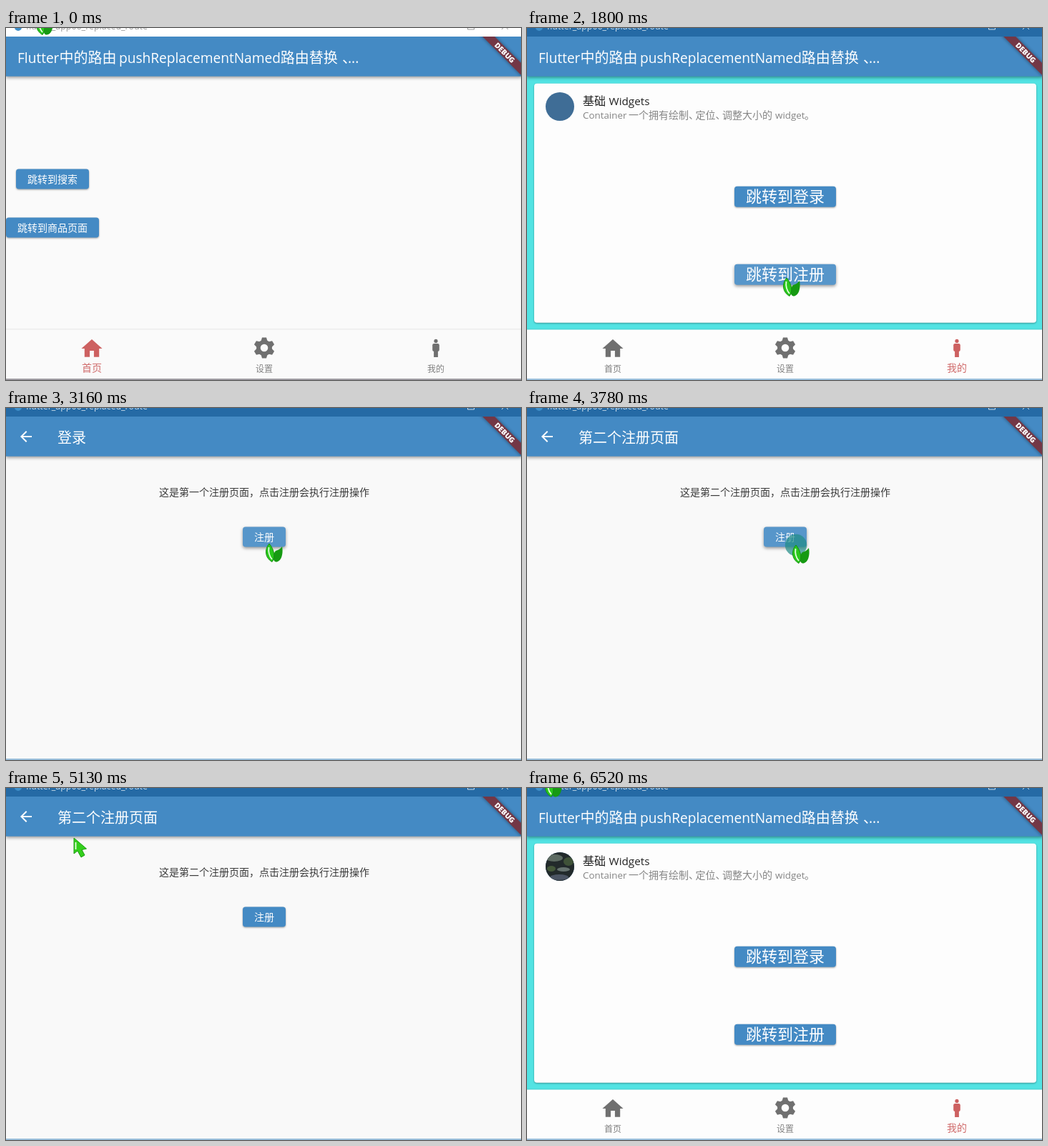
Animation of 720 by 493 pixels, one loop 6.72 s. Source, as an HTML page:

```html
<!DOCTYPE html>
<html lang="zh-CN">
<head>
<meta charset="utf-8">
<style>
html, body { margin: 0; height: 100%; overflow: hidden; background: #fafafa; }
svg { display: block; width: 100vw; height: 100vh; font-family: "Open Sans", "Noto Sans CJK SC", sans-serif;
  --bar: #256aa5; --ink: #cfdfec; --line: #3d86be; }
svg.inactive { --bar: #fff; --ink: #999; --line: #4a4450; }
.appbar { fill: #448ac4; filter: drop-shadow(0 2px 2px rgba(0,0,0,.38)); }
.button { filter: drop-shadow(0 1.5px 1px rgba(0,0,0,.36)); }
.button.hover { filter: drop-shadow(0 2.5px 2px rgba(0,0,0,.4)); }
.button .tint { fill: #fff; opacity: 0; }
.button.hover .tint { opacity: .1; }
.card { fill: #fdfdfd; filter: drop-shadow(0 1px 1px rgba(0,0,0,.35)); }
.banner { filter: drop-shadow(0 0 2.5px rgba(0,0,0,.5)); }
</style>
</head>
<body>
<svg id="stage" viewBox="0 0 720 493"></svg>
<script>
const LOOP = 6720;
const STEPS = [0, 170, 380, 580, 790, 990, 1210, 1410, 1610, 1800, 2000, 2190, 2390, 2590, 2790, 2990, 3180,
  3380, 3580, 3780, 3980, 4170, 4360, 4560, 4750, 4940, 5130, 5330, 5520, 5710, 5890, 6110, 6320, 6520];
const PRESS = 850, OPEN_FIRST = 2144, REPLACE = 3380, POP = 5674, ROUTE_MS = 300;

// time, x, y, hand pointer
const POINTER = [
  [0, 44, -16, 1], [170, 46, -10, 0], [790, 583, 453, 1], [1210, 583, 453, 1], [1410, 560, 440, 0],
  [1800, 360, 350, 1], [2000, 350, 344, 1], [2300, 349, 340, 0], [2590, 349, 340, 0], [2990, 365, 190, 1],
  [3180, 373, 192, 1], [3980, 373, 192, 0], [4360, 230, 120, 0], [4750, 60, 30, 0], [5130, 95, 70, 0],
  [5520, 27, 43, 1], [6110, 27, 43, 1], [6320, 27, 18, 1], [6520, 27, -13, 1], [LOOP, 27, -13, 1]
];
// time, x, y, colour, opacity
const CLICKS = [
  [980, 583, 453, '#4a9488', .48], [2150, 350, 344, '#5a7296', .36],
  [3380, 376, 192, '#1f8c86', .7], [5670, 28, 44, '#1d4468', .2]
];

const text = (x, y, size, str, fill = '#fff', anchor = 'start') =>
  `<text x="${x}" y="${y}" font-size="${size}" fill="${fill}" text-anchor="${anchor}">` +
  str.replace(/[\w.]+/g, s => `<tspan font-size="${size * .955}">${s}</tspan>`) + '</text>';

const button = (x, y, w, h, size, label) => {
  const box = `x="${x}" y="${y}" width="${w}" height="${h}" rx="4"`;
  return `<g class="button" data-box="${x},${y},${w},${h}"><rect ${box} fill="#448ac4"/><rect class="tint" ${box}/>` +
    text(x + w / 2, y + h / 2 + size * .37, size, label, '#fff', 'middle') + '</g>';
};

const appbar = '<rect class="appbar" y="12" width="720" height="55.7"/>';
const mainBar = appbar + text(16, 48.5, 20, 'Flutter中的路由') +
  text(158, 48.5, 20, 'pushReplacementNamed路由替换') + text(470, 48.5, 20, '、') + text(478, 48.5, 20, '...');

const tooth = a => `<path d="M-4.6-9L-3-14.5H3L4.6-9z" transform="rotate(${a})"/>`;
const TABS = [
  ['首页', 120, '<path d="M10 20v-6h4v6h5v-8h3L12 3 2 12h3v8z" transform="translate(-17.5 -16.4) scale(1.458)"/>'],
  ['设置', 361, '<circle r="8.1" fill="none" stroke="currentColor" stroke-width="5.6"/>' +
    [0, 60, 120, 180, 240, 300].map(tooth).join('')],
  ['我的', 601, '<circle cy="-9.6" r="2.6"/><rect x="-4.8" y="-6" width="9.6" height="11" rx="2.2"/>' +
    '<rect x="-2.9" y="0" width="5.8" height="13"/>']
];
const nav = (selected, fill) =>
  `<rect y="421" width="720" height="2" fill="#000" opacity=".05"/><rect y="422.5" width="720" height="71" fill="${fill}"/>` +
  (selected ? '' : '<circle id="ripple" cx="601.5" cy="457" r="35" fill="#ededed"/>') +
  TABS.map(([label, x, icon], i) => {
    const on = i === selected, color = on ? '#cd6161' : '#707070';
    return `<g transform="translate(${x} 448)" fill="${color}" color="${color}">${icon}</g>` +
      text(x, on ? 480.5 : 481.5, on ? 14 : 12, label, on ? '#d06c6c' : '#808080', 'middle');
  }).join('');

const avatar = `<clipPath id="round"><circle cx="46" cy="110" r="20"/></clipPath>
  <circle cx="46" cy="110" r="20" fill="#3f6d96"/>
  <g id="photo" clip-path="url(#round)"><rect x="26" y="90" width="40" height="40" fill="#222a2b"/>
  <ellipse cx="38" cy="98" rx="12" ry="5" fill="#5d6b62"/><ellipse cx="58" cy="103" rx="7" ry="6" fill="#3f5238"/>
  <ellipse cx="34" cy="113" rx="6" ry="4" fill="#44583a"/><ellipse cx="51" cy="114" rx="9" ry="3" fill="#66736f"/>
  <ellipse cx="45" cy="125" rx="13" ry="4" fill="#4b5463"/></g>`;

const routePage = (id, title, message) => `<g id="${id}"><rect y="12" width="720" height="481" fill="#f9f9f9"/>${appbar}
  <path d="M20 11H7.83l5.59-5.59L12 4l-8 8 8 8 1.41-1.41L7.83 13H20z" fill="#fff" transform="translate(16 28)"/>
  ${text(72, 48.5, 20, title)}${text(214, 122.5, 14, message, '#3a3a3a')}${button(331, 166.5, 60, 28, 14, '注册')}</g>`;

const stage = document.getElementById('stage');
stage.innerHTML = `
<g id="home"><rect width="720" height="493" fill="#fafafa"/>${mainBar}
  ${button(14, 197.5, 102, 28, 14, '跳转到搜索')}${button(0, 265.5, 130, 28, 14, '跳转到商品页面')}${nav(0, '#fafafa')}</g>
<g id="mine"><rect width="720" height="493" fill="#52e3e3"/>${mainBar}
  <rect class="card" x="10" y="77.7" width="702" height="335" rx="4"/>${avatar}
  ${text(78, 108, 16, '基础', '#222')}${text(114.5, 108, 16, 'Widgets', '#222')}
  ${[[78, 'Container'], [142, '一个拥有绘制、'], [235.5, '定位、'], [273, '调整大小的'], [347, 'widget'], [388, '。']]
    .map(([x, s]) => text(x, 127, 14, s, '#858585')).join('')}
  ${button(290, 221.7, 142, 29, 22, '跳转到登录')}${button(290, 330.7, 142, 29, 22, '跳转到注册')}${nav(2, '#fdfdfd')}</g>
${routePage('first', '登录', '这是第一个注册页面，点击注册会执行注册操作')}
${routePage('second', '第二个注册页面', '这是第二个注册页面，点击注册会执行注册操作')}
<clipPath id="body"><rect y="12" width="720" height="481"/></clipPath>
<g clip-path="url(#body)"><g transform="translate(720 12) rotate(45)">
  <rect class="banner" x="-42" y="26" width="84" height="12" fill="#7a2c35" opacity=".88"/>
  <text y="35.7" font-size="10.2" font-weight="800" fill="#fff" text-anchor="middle">DEBUG</text></g></g>
<rect width="720" height="12" fill="var(--bar)"/>
<circle cx="17" cy="-1" r="5" fill="#3f8fca"/>
${text(28, 2, 13, 'flutter_app06_replaced_route', 'var(--ink)')}
<path d="M645.5-7v9h9v-9M693-7l9 9m0-9l-9 9" fill="none" stroke="var(--ink)"/>
<rect y="491.5" width="720" height="1" fill="var(--line)"/>
<circle id="click"/>
<g id="hand"><path d="M23 4C25 14 22 26 14 25.500C9 24 10 14 14 10C17 9 20 8 23 4z" fill="#169a12"/>
  <path d="M5 0C-2 8-1 20 9 25.500C14 19 12 8 5 0z" fill="#2ac81c" stroke="#148c10"/>
  <path d="M4.500 5Q3 15 9 22" fill="none" stroke="#e6ffe0" stroke-width="1.8"/></g>
<g id="arrow"><path d="M0 0V22L5 18L10 27L15 24L11 16.5L17.500 15z" fill="#34d01c" stroke="#1b9b12" stroke-linejoin="round"/>
  <path d="M2.500 6V16" stroke="#e6ffe0" stroke-width="1.8"/></g>`;

const $ = id => document.getElementById(id);
const show = (id, on) => $(id).style.display = on ? '' : 'none';
const clamp = v => Math.max(0, Math.min(1, v));
const buttons = [...document.querySelectorAll('.button')].map(el => [el, el.dataset.box.split(',').map(Number)]);

function bezier(x1, y1, x2, y2) {
  const at = (a, b, s) => 3 * (1 - s) * s * ((1 - s) * a + s * b) + s ** 3;
  return x => {
    let lo = 0, hi = 1;
    for (let i = 0; i < 24; i++) {
      const mid = (lo + hi) / 2;
      if (at(x1, x2, mid) < x) lo = mid; else hi = mid;
    }
    return at(y1, y2, lo);
  };
}
const slide = bezier(.4, 0, .2, 1), fade = bezier(.42, 0, 1, 1);

function route(id, progress) {
  const p = clamp(progress);
  show(id, p > 0);
  $(id).setAttribute('opacity', p === 1 ? 1 : fade(p));
  $(id).setAttribute('transform', `translate(0 ${(1 - slide(p)) * 120})`);
}

function pointerAt(t) {
  const i = POINTER.findLastIndex(k => k[0] <= t);
  const a = POINTER[i], b = POINTER[i + 1] || a;
  const p = (t - a[0]) / (b[0] - a[0] || 1), e = p * p * (3 - 2 * p);
  return [a[1] + (b[1] - a[1]) * e, a[2] + (b[2] - a[2]) * e, a[3]];
}

function draw(t) {
  stage.classList.toggle('inactive', t < PRESS);
  show('home', t < 1200);
  show('mine', t >= 1200);
  show('ripple', t >= PRESS);
  show('photo', t > 2600);
  route('first', t < REPLACE + ROUTE_MS ? (t - OPEN_FIRST) / ROUTE_MS : 0);
  route('second', t < POP ? (t - REPLACE) / ROUTE_MS : 1 - (t - POP) / ROUTE_MS);

  const [x, y, hand] = pointerAt(t);
  for (const [el, [bx, by, w, h]] of buttons)
    el.classList.toggle('hover', x >= bx && x <= bx + w && y >= by && y <= by + h);
  for (const id of ['hand', 'arrow']) {
    show(id, (id === 'hand') === !!hand);
    $(id).setAttribute('transform', `translate(${x - (hand ? 2 : 0)} ${y})`);
  }

  const click = CLICKS.find(c => t >= c[0] && t < c[0] + 420);
  show('click', click);
  if (click) {
    const [start, cx, cy, fill, opacity] = click;
    const attrs = { cx, cy, fill, opacity, r: 24 - (t - start) * .022 };
    for (const k in attrs) $('click').setAttribute(k, attrs[k]);
  }
}

function frame() {
  const now = performance.now() % LOOP;
  draw(STEPS.findLast(s => s <= now));
  requestAnimationFrame(frame);
}
frame();
</script>
</body>
</html>
```
